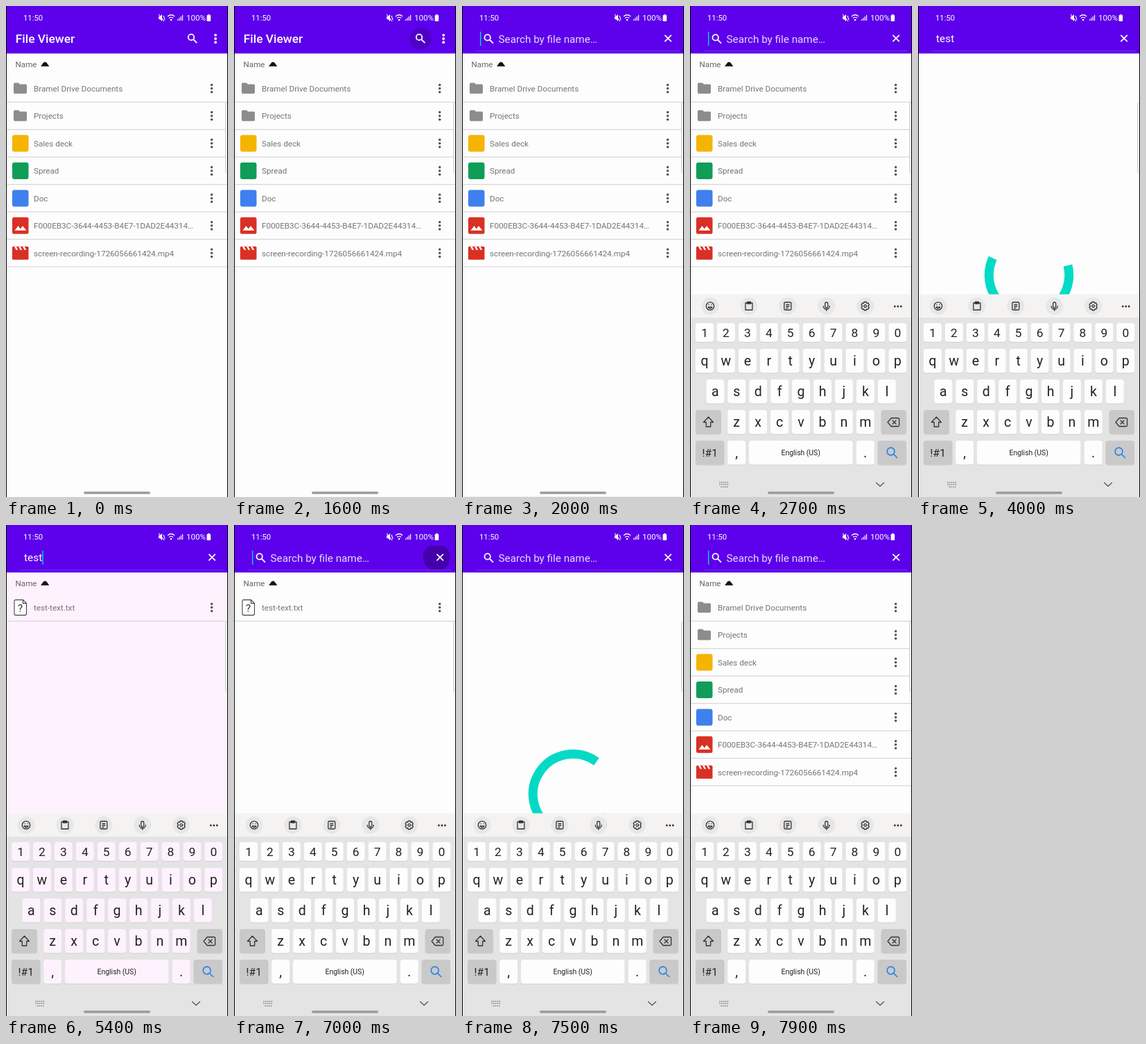
Animation of 320x706 px, one loop 8000 ms. Source, as an HTML page:

```html
<!DOCTYPE html>
<html lang="en">
<head>
<meta charset="utf-8">
<title>File Viewer</title>
<style>
  html, body { margin: 0; width: 100%; height: 100%; overflow: hidden; background: #000; }
  svg { display: block; width: 100vw; height: 100vh; --paper: #fdfdfd; font-family: Roboto, sans-serif; }
  text { white-space: pre; }
  .paper { fill: var(--paper); }
  .line { fill: none; stroke: #333; stroke-width: 1.3; stroke-linecap: round; stroke-linejoin: round; }
  .white { fill: none; stroke: #fff; stroke-width: 1.8; }
</style>
</head>
<body>
<svg id="stage" viewBox="0 0 320 706"></svg>
<script>
const rect = (x, y, w, h, fill, r = 0) =>
  `<rect x="${x}" y="${y}" width="${w}" height="${h}" rx="${r}" ${fill ? `fill="${fill}"` : 'class="paper"'}/>`;
const text = (x, y, size, fill, string, extra = '') =>
  `<text x="${x}" y="${y}" font-size="${size}" fill="${fill}" ${extra}>${string}</text>`;
const path = (d, attrs) => `<path d="${d}" ${attrs}/>`;
const circle = (x, y, r, attrs) => `<circle cx="${x}" cy="${y}" r="${r}" ${attrs}/>`;
const group = (id, body) => `<g id="${id}">${body}</g>`;
const dots = (x, y, fill, r = 1.8) =>
  [-5.2, 0, 5.2].map(d => circle(x, y + d, r, `fill="${fill}"`)).join('');
const magnifier = (x, y) =>
  circle(x - 1.8, y - 1.8, 4.2, 'class="white"') + path(`M${x + 1.3} ${y + 1.3}l5.2 5.2`, 'class="white"');

// File list
const icons = {
  folder: y => path(`M11 ${y - 6.5}q0-1.7 1.7-1.7h5.3l2 2h8.3q1.7 0 1.7 1.7v10.2q0 1.7-1.7 1.7h-15.6q-1.7 0-1.7-1.7z`, 'fill="#8c8c8c"'),
  yellow: y => rect(9, y - 12, 23.5, 24, '#f4b400', 3),
  green: y => rect(9, y - 12, 23.5, 24, '#109d58', 3),
  blue: y => rect(9, y - 12, 23.5, 24, '#3f80ee', 3),
  image: y => rect(9, y - 12, 23.5, 24, '#d93025', 2.5) +
    path(`M12.5 ${y + 7}l5-6.5 3.3 4.2 3.2-4.2 5.5 6.5z`, 'fill="#fff"'),
  video: y => rect(9, y - 9.5, 23.5, 19, '#d93025', 1.5) +
    [13, 19, 25].map(x => path(`M${x - 1} ${y - 9.5}h2.6l2.6 5h-2.6z`, 'fill="#fff"')).join(''),
  unknown: y => path(`M14 ${y - 11}h10.5l5 5v15q0 2-2 2h-13.5q-2 0-2-2v-18q0-2 2-2zM24.5 ${y - 11}v5h5`,
    'fill="#fff" stroke="#444" stroke-width="1.1"') +
    text(20.5, y + 6, 15, '#333', '?', 'text-anchor="middle"'),
};
const row = ([icon, name], i) => {
  const y = 118.6 + 39.45 * i;
  return icons[icon](y) + text(40, y + 4.3, 11.68, '#757575', name) + dots(296.5, y, '#555', 1.75) +
    rect(1, y + 19, 318, 1.2, '#d6d6d6');
};
const files = [
  ['folder', 'Bramel Drive Documents'], ['folder', 'Projects'], ['yellow', 'Sales deck'],
  ['green', 'Spread'], ['blue', 'Doc'], ['image', 'F000EB3C-3644-4453-B4E7-1DAD2E44314…'],
  ['video', 'screen-recording-1726056661424.mp4'],
];
const sorter = text(13.5, 88, 11.65, '#666', 'Name') + path('M50 86.7l4-5.2q2.2-2 4.4 0l4 5.2z', 'fill="#111"');

// Header
const statusBar = text(25, 21, 11.3, '#fff', '11:50') + text(260, 21, 11.5, '#fff', '100%') +
  path('M220 15h2l3-3v10l-3-3h-2z', 'fill="#fff"') +
  path('M220 12l8 10M227 14l2 6', 'class="white" style="stroke-width:1.1"') +
  path('M233 15q5-4.5 10 0M235 17.5q3-2.5 6 0', 'class="white" style="stroke-width:1.2"') +
  circle(238, 20, 1.3, 'fill="#fff"') +
  [0, 1, 2, 3].map(i => rect(247 + 2.3 * i, 19 - 2 * i, 1.2, 2 + 2 * i, '#fff')).join('') +
  rect(289.5, 13, 5.5, 9, '#fff', 1) + rect(291, 12, 2.5, 2, '#fff');
const titleBar = circle(269, 47, 16, 'id="searchRipple"') + text(13.7, 53, 17.4, '#fff', 'File Viewer', 'font-weight="500"') +
  magnifier(268.7, 46.7) + dots(302, 47, '#fff', 1.9);
const searchBar = rect(20, 64.3, 293, 0.8, '#7d36f0') +
  '<clipPath id="bounds"><rect x="270" y="30" width="42" height="34"/></clipPath>' +
  circle(292, 46.5, 19.5, 'id="clearRipple" clip-path="url(#bounds)"') +
  group('hint', magnifier(38.5, 47.2) + text(52.5, 52.8, 15.25, '#e6daff', 'Search by file name…')) +
  text(26, 52, 15.4, '#fff', '', 'id="query"') + rect(0, 37, 1.4, 20, '#03dac5').replace('<rect', '<rect id="cursor"') +
  path('M292.3 41.8l9.4 9.4m0-9.4l-9.4 9.4', 'class="white"');

// Keyboard
const pitch = 30.92;
const key = (x, y, w, h, label, size, fill) =>
  rect(x, y + 1, w, h, '#cfcfcf', 4) + rect(x, y, w, h, fill, 4) +
  text(x + w / 2, y + h / 2 + size * 0.35, size, '#222', label, 'text-anchor="middle"');
const keyRow = (letters, x, y, h, size) =>
  [...letters].map((c, i) => key(x + pitch * i, y, 26, h, c, size)).join('');
const gray = '#c9c9c9';
const tools = [
  circle(0, 0, 5.7, '') + path('M-3 1.3q3 4 6 0zM-2-2v.2M2-2v.2', ''),
  path('M-5-4.5h10v10h-10zM-2.5-6h5v2.5h-5z', ''),
  path('M-3.5-5.5h7q1.5 0 1.5 1.5v8q0 1.5-1.5 1.5h-7q-1.5 0-1.5-1.5v-8q0-1.5 1.5-1.5zM-2-2h4M-2 .5h4M-2 3h2', ''),
  path('M-2-3.5a2 2 0 0 1 4 0v4a2 2 0 0 1-4 0zM-4.5 0a4.5 4.5 0 0 0 9 0M0 4.5v2', ''),
  path('M-1.5-6h3l.6 1.9 2-.4 1.5 2.6-1.4 1.9 1.4 1.9-1.5 2.6-2-.4-.6 1.9h-3l-.6-1.9-2 .4-1.5-2.6 1.4-1.9-1.4-1.9 1.5-2.6 2 .4z', '') + circle(0, 0, 1.8, ''),
];
const keyboard = rect(1, 414.5, 318, 34, '#f4f3f2') + rect(1, 448, 318, 258, '#e4e4e4') +
  tools.map((icon, i) => `<g transform="translate(${29 + 55.9 * i} 431.5)" class="line">` +
    circle(0, 0, 12.5, 'fill="#e7e7e7" stroke="none"') + icon + '</g>').join('') +
  [-4.5, 0, 4.5].map(d => circle(299.7 + d, 432, 1.4, 'fill="#333"')).join('') +
  keyRow('1234567890', 8, 456, 27, 17.3) + keyRow('qwertyuiop', 8, 493, 34.5, 19.5) +
  keyRow('asdfghjkl', 23.4, 537, 34.5, 19.5) + keyRow('zxcvbnm', 54.2, 581, 34.5, 19.5) +
  key(8, 581, 37, 34.5, '', 10, gray) + key(275.5, 581, 36.5, 34.5, '', 10, gray) +
  key(8, 625, 41.5, 34.5, '!#1', 15.5, gray) + key(54.2, 625, 26, 34.5, ',', 19.5) +
  key(85, 625, 149.5, 34.5, 'English (US)', 10.4) + key(239.7, 625, 26, 34.5, '.', 19.5) +
  key(270.5, 625, 41.5, 34.5, '', 10, gray) +
  path('M26.5 591l7 7.5h-3.8v6.5h-6.4v-6.5h-3.8z', 'class="line"') +
  path('M285 598.5l5-6h10q1.5 0 1.5 1.5v9q0 1.5-1.5 1.5h-10zM292 596l5 5m0-5l-5 5', 'class="line"') +
  circle(289.5, 640.5, 5.4, 'class="line" style="stroke:#2483ee;stroke-width:1.6"') +
  path('M293.5 644.5l5 5', 'class="line" style="stroke:#2483ee;stroke-width:1.6"') +
  path('M43 685h13M43 688h13M45 691.5h9', 'class="line" style="stroke:#666;stroke-dasharray:.3 2.5"') +
  path('M268.5 685.5l5.5 5 5.5-5', 'class="line" style="stroke:#555"');

const stage = document.getElementById('stage');
stage.innerHTML = rect(1, 0, 318, 706) +
  group('allFiles', sorter + files.map(row).join('')) +
  group('results', sorter + row(['unknown', 'test-text.txt'], 0)) +
  path('', 'id="spinner" fill="none" stroke="#03dac5" stroke-width="13"') +
  path('M320 139h-2q-1.5 0-1.5 2v97q0 2 1.5 2h2', 'fill="#f1f1f1" stroke="#c4c4c4" stroke-width=".8"') +
  rect(1, 0, 318, 68.3, '#5d00ec') + statusBar + group('titleBar', titleBar) + group('searchBar', searchBar) +
  group('keyboard', keyboard) + rect(112, 698.3, 96, 3.4, '#9c9c9c', 1.7) +
  rect(0, 0, 1, 706, '#000') + rect(319, 0, 1, 706, '#000');

const el = id => document.getElementById(id);
const show = (id, on) => { el(id).style.display = on ? '' : 'none'; };
const ramp = (t, from, to) => Math.min(1, Math.max(0, (t - from) / (to - from)));

// Eased sweep with control points (x1, 0) and (x2, 1)
function ease(x, x1, x2) {
  let low = 0, high = 1, u = 0.5;
  for (let i = 0; i < 20; i++) {
    u = (low + high) / 2;
    const at = 3 * x1 * u * (1 - u) ** 2 + 3 * x2 * u * u * (1 - u) + u ** 3;
    if (at < x) low = u; else high = u;
  }
  return u * u * (3 - 2 * u);
}

function spinnerArc(time) {
  const p = time / 1333 % 1;
  const turn = time * 720 / 4444 + p * 90 - 90;
  const start = turn + 270 * ease(Math.max(0, p * 2 - 1), 0.4, 0.2);
  const end = turn + 11 + 270 * ease(Math.min(1, p * 2), 0.4, 0.2);
  const point = a => `${160 + 57.7 * Math.cos(a * Math.PI / 180)} ${387 + 57.7 * Math.sin(a * Math.PI / 180)}`;
  return `M${point(start)}A57.7 57.7 0 ${+(end - start > 180)} 1 ${point(end)}`;
}

const typing = [3000, 3100, 3300, 3400];
const opened = 1700, cleared = 6700;

function draw(now) {
  const t = now % 8000;
  const searching = t >= opened;
  const loading = t >= 3800 && t < 4900 || t >= 7100 && t < 7900;
  const found = t >= 4900 && t < 7100;

  show('allFiles', !loading && !found);
  show('results', found);
  show('spinner', loading);
  show('titleBar', !searching);
  show('searchBar', searching);
  show('keyboard', t >= 2000);
  stage.style.setProperty('--paper', t >= 4900 && t < cleared ? '#fef2fe' : '#fdfdfd');
  if (loading) el('spinner').setAttribute('d', spinnerArc(t - (t < 5000 ? 3670 : 6970)));

  const typed = t < cleared ? typing.filter(at => t >= at) : [];
  el('query').textContent = 'test'.slice(0, typed.length);
  show('hint', !typed.length);
  const lastEdit = t >= cleared ? cleared : typed.length ? typed[typed.length - 1] : opened;
  show('cursor', Math.floor((t - lastEdit) / 500) % 2 === 0);
  el('cursor').setAttribute('x', 26 + (typed.length ? el('query').getComputedTextLength() : 0));

  el('searchRipple').setAttribute('opacity', t >= 1600 ? 0.15 : 0);
  el('clearRipple').setAttribute('opacity', 0.28 * ramp(t, 6100, 6400) * (1 - ramp(t, 7050, 7350)));
  const slide = (1 - ramp(t, 2000, 2400)) ** 3;
  el('keyboard').setAttribute('transform', `translate(0 ${292 * slide})`);
}

function loop(now) {
  draw(now);
  requestAnimationFrame(loop);
}
draw(0);
requestAnimationFrame(loop);
</script>
</body>
</html>
```
